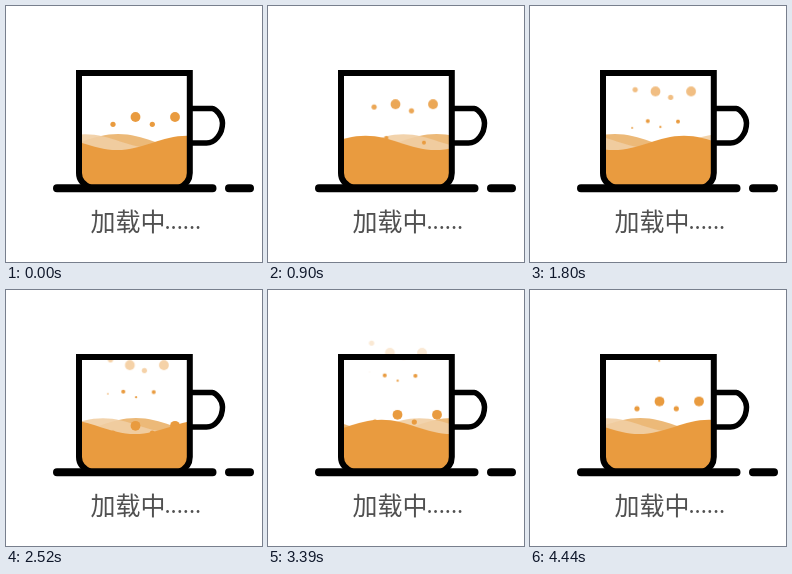
Recreate the animation shown at these times as an HTML page. Size 256x256 px, loop 4470 ms.

```html
<!DOCTYPE html>
<html lang="zh">
<head>
<meta charset="utf-8">
<title>Loading cup</title>
<style>
  :root { --loop: 4470ms; --liquid: #e99b3f; }
  html, body { margin: 0; width: 100%; height: 100%; overflow: hidden; background: #fff; }
  svg { display: block; width: 100vw; height: 100vh; }

  .wave { animation: slide calc(var(--loop) / 2) linear infinite; }
  .front, circle { fill: var(--liquid); }
  .back { fill: #ecb978; }
  .middle { fill: #f1cfa3; opacity: .9; }

  circle { animation: rise var(--loop) linear infinite; }
  .fading circle { animation-name: rise, fade; }
  .tiny { animation-name: rise, vanish; }
  .drift { animation-name: drift; }

  .cup { fill: none; stroke: #000; stroke-width: 6; }
  .base { stroke-width: 8; stroke-linecap: round; }
  text {
    font-family: "Noto Sans CJK SC", "Noto Sans CJK", sans-serif;
    font-size: 25px; font-weight: 500; fill: #505050;
  }
  .dots { font-size: 22px; }

  /* One wavelength per cycle, two cycles per loop */
  @keyframes slide {
    to { transform: translateX(140px); }
  }
  @keyframes rise {
    to { transform: translate(var(--dx, 0px), var(--dy)); }
  }
  @keyframes fade {
    0%, 10% { opacity: 1; }
    95%, 100% { opacity: 0; }
  }
  @keyframes vanish {
    0%, 40% { opacity: .9; }
    78%, 100% { opacity: 0; }
  }
  @keyframes drift {
    0% { transform: translate(9px, 42px); }
    20% { transform: translate(8px, 21px); }
    40% { transform: translate(0, 0); }
    100% { transform: translate(-1px, -50px); }
  }
</style>
</head>
<body>
<svg viewBox="0 0 256 256">
  <defs>
    <clipPath id="inside">
      <path d="M75 69H182V167Q182 176 173 180H85Q75 176 75 167Z"/>
    </clipPath>
    <path id="swell" d="M-99 129.7c25.5 0 44.5 14.3 70 14.3s44.5-14.3 70-14.3s44.5 14.3 70 14.3s44.5-14.3 70-14.3s44.5 14.3 70 14.3s44.5-14.3 70-14.3V182H-99Z"/>
  </defs>

  <g class="fading">
    <circle cx="107" cy="118.3" r="2.6" style="--dx:-4.5px;--dy:-86px"/>
    <circle cx="129.5" cy="111" r="4.9" style="--dx:-10px;--dy:-63.5px"/>
    <circle cx="146.3" cy="118.3" r="2.6" style="--dx:-14px;--dy:-67px"/>
    <circle cx="169" cy="111" r="4.9" style="--dx:-19.7px;--dy:-63.5px"/>
  </g>

  <g clip-path="url(#inside)">
    <g class="wave">
      <use class="back" href="#swell" x="-69" y="-1.7"/>
      <use class="middle" href="#swell" x="-102" y="-1.5"/>
    </g>

    <circle class="tiny" cx="103" cy="167" r="1" style="--dx:-2px;--dy:-112px"/>
    <circle cx="119" cy="148.7" r="2" style="--dx:-3px;--dy:-83.5px"/>
    <circle cx="131.2" cy="155.2" r="1.1" style="--dx:-2px;--dy:-85px"/>
    <circle class="drift" cx="148" cy="115.7" r="2"/>

    <g style="--dy:-56.8px">
      <circle cx="107" cy="175.1" r="2.6"/>
      <circle cx="129.5" cy="167.8" r="4.9"/>
      <circle cx="146.3" cy="175.1" r="2.6"/>
      <circle cx="169" cy="167.8" r="4.9"/>
    </g>

    <g class="wave"><use class="front" href="#swell"/></g>
  </g>

  <g class="cup">
    <path d="M73 67H183.8V167Q183.8 177 173 182H85Q73 177 73 167Z"/>
    <path d="M184 102.4H206C210 103 216.5 110 216.5 117C216.5 128 209 137 200.5 137H184" stroke-width="5.5"/>
    <path class="base" d="M51 182.2H206.5M223 182.2H244"/>
  </g>

  <text x="84.5" y="225">加载中<tspan class="dots" x="158.5" y="223">......</tspan></text>
</svg>
</body>
</html>
```
